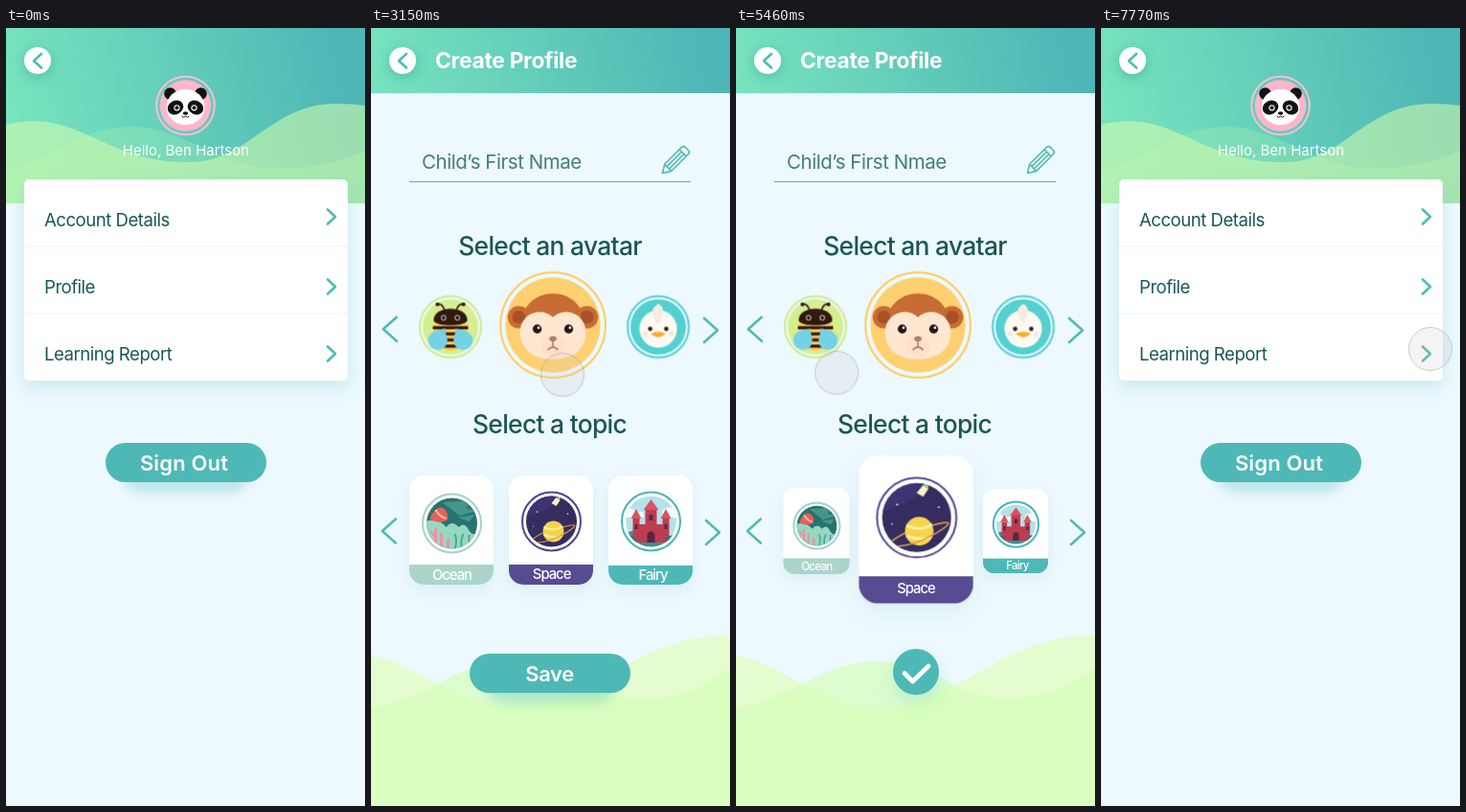
An HTML page that plays this animation: 375x812 px, repeating every 8 s.

```html
<!DOCTYPE html>
<html lang="en">
<head>
<meta charset="utf-8">
<title>Profile flow</title>
<style>
html, body { margin: 0; width: 100%; height: 100%; overflow: hidden; background: #edf9fe; }
svg { display: block; width: 375px; height: 812px; }
text { font-family: Inter, Roboto, sans-serif; fill: #1b5657; }
.mid { text-anchor: middle; }
.row { font-size: 18.6px; letter-spacing: -.5px; }
.heading { font-size: 26.4px; font-weight: 500; letter-spacing: -.7px; }
.button { font-size: 22px; font-weight: 600; fill: #fff; }
.label { font-size: 14.8px; font-weight: 500; letter-spacing: -1px; fill: #fff; }
.line { fill: none; stroke: #50bbb5; stroke-width: 2.6; stroke-linecap: round; stroke-linejoin: round; }
.ring { fill: none; stroke-width: 2; vector-effect: non-scaling-stroke; }
.soft { filter: drop-shadow(0 7px 9px rgba(60, 170, 175, .2)); }
.faint { filter: drop-shadow(0 6px 8px rgba(70, 150, 180, .1)); }
.shade { fill: #4eb8b6; opacity: .3; filter: blur(6px); }

#profile, #save, #tick, #press, #rest { animation: 8s step-end infinite; }
#profile { animation-name: profile; }
#save { animation-name: save; }
#tick { animation-name: tick; }
#press { animation-name: press; }
#rest { animation-name: rest; }
@keyframes profile { 0% { opacity: 0 } 17.5% { opacity: 1 } 79.625%, 100% { opacity: 0 } }
@keyframes save { 0% { opacity: 1 } 60.375%, 100% { opacity: 0 } }
@keyframes tick { 0% { opacity: 0 } 60.375%, 100% { opacity: 1 } }
@keyframes press {
  0%, 17.5%, 35%, 49%, 60.375%, 79.625%, 100% { opacity: 0 }
  15.75%, 33.25%, 47.25%, 59.5%, 77.875% { opacity: 1 }
}
@keyframes rest {
  0%, 17.5%, 35%, 49%, 60.375%, 79.625%, 100% { opacity: 1 }
  15.75%, 33.25%, 47.25%, 59.5%, 77.875% { opacity: 0 }
}

/* each item goes from its first place (--a) to its second (--b) */
.avatar { animation: pick-avatar 8s ease-out infinite; }
.topic { animation: pick-topic 8s ease-out infinite; }
@keyframes pick-avatar { 0%, 34.125% { transform: var(--a) } 37.625%, 100% { transform: var(--b) } }
@keyframes pick-topic { 0%, 48.125% { transform: var(--a) } 51.625%, 100% { transform: var(--b) } }
#bee { --a: translate(91px, 315px) scale(1); --b: translate(83px, 312px) scale(.8); }
#monkey { --a: translate(188px, 315px) scale(1); --b: translate(190px, 310px) scale(1.37); }
#bird { --a: translate(283px, 315px) scale(1); --b: translate(300px, 312px) scale(.8); }
#ocean { --a: translate(84px, 524px) scale(1); --b: translate(84px, 525px) scale(.79); }
#space { --a: translate(188px, 524px) scale(1); --b: translate(188px, 523.2px) scale(1.36); }
#fairy { --a: translate(292px, 524px) scale(1); --b: translate(292px, 525px) scale(.775); }
#space-label { --a: translate(188.6px, 575px); --b: translate(188px, 590px); }

#cursor { animation: travel 8s ease-in-out infinite; }
@keyframes travel {
  0%, 1.75% { transform: translate(392px, -30px) }
  7.875%, 10.5% { transform: translate(344px, 265px) }
  12.25%, 21.875% { transform: translate(344px, 272px) }
  27.125% { transform: translate(206px, 504px) }
  28% { transform: translate(206px, 504px); animation-timing-function: linear }
  28.875% { transform: translate(200px, 438px); animation-timing-function: linear }
  29.75% { transform: translate(199px, 369px); animation-timing-function: ease-out }
  30.625%, 31.5% { transform: translate(199px, 329px) }
  32.375%, 37.625% { transform: translate(199px, 324px) }
  43.75%, 44.625% { transform: translate(205px, 544px) }
  46.375%, 51.625% { transform: translate(199px, 536px) }
  56.875%, 63% { transform: translate(188px, 678px) }
  73.5% { transform: translate(23px, 44px) }
  74.375%, 84% { transform: translate(24px, 42px) }
  94.5% { transform: translate(339px, 329px) }
  97.125%, 100% { transform: translate(344px, 335px) }
}
</style>
</head>
<body>
<svg viewBox="0 0 375 812">
  <defs>
    <linearGradient id="top" gradientUnits="userSpaceOnUse" x1="10" y1="110" x2="350" y2="30">
      <stop offset="0" stop-color="#78e4be"/><stop offset="1" stop-color="#4eb6b6"/>
    </linearGradient>
    <clipPath id="disc"><circle r="26.5"/></clipPath>
    <clipPath id="card"><rect x="-44" y="-57" width="88" height="114" rx="15"/></clipPath>
    <path id="next" class="line" d="M-4-7.5 4 0l-8 7.5"/>
    <path id="arrow" class="line" d="M-7-12.5 7 0-7 12.5"/>
    <g id="back">
      <circle cx="33" cy="34" r="14" fill="#fff" style="filter:drop-shadow(0 3px 7px rgba(20,120,120,.35))"/>
      <path class="line" d="M37 27l-8 7.2 8 7.3"/>
    </g>
  </defs>

  <rect width="375" height="812" fill="#edf9fe"/>

  <g id="account">
    <rect width="375" height="183" fill="url(#top)"/>
    <path d="M0 150C45 140 75 103 130 103S225 147 285 147C325 147 350 138 375 128V183H0Z" fill="#a5f0b0" opacity=".3"/>
    <path d="M0 101C75 82 100 140 190 140C255 140 275 79 345 79Q362 79 375 81V183H0Z" fill="#d2fbad" opacity=".58"/>
    <use href="#back"/>

    <g transform="translate(187.5 81)">
      <circle r="30.3" fill="none" stroke="#f8bfd2" stroke-width="2"/>
      <circle r="26.8" fill="#ffb5cb"/>
      <g fill="#111">
        <circle cx="-16" cy="-12.5" r="6.3"/><circle cx="16" cy="-12.5" r="6.3"/>
        <ellipse cy="1.5" rx="20" ry="18.7" fill="#fff"/>
        <ellipse cx="-10.5" cy="2" rx="8.6" ry="7" transform="rotate(-28 -10.5 2)"/>
        <ellipse cx="10.5" cy="2" rx="8.6" ry="7" transform="rotate(28 10.5 2)"/>
        <g stroke="#fff" stroke-width="1.1"><circle cx="-9" cy="2.3" r="2.6"/><circle cx="9" cy="2.3" r="2.6"/></g>
        <ellipse cy="8" rx="2.8" ry="1.7"/>
        <path d="M-4 11q2 2.5 4 0q2 2.5 4 0" fill="none" stroke="#111"/>
      </g>
    </g>
    <text class="mid" x="188" y="133" style="font-size:15px;fill:#fff">Hello, Ben Hartson</text>

    <rect x="19" y="158" width="338" height="210" rx="5" fill="#fff" class="soft"/>
    <path d="M19 228h338M19 298h338" stroke="#eef7f8" stroke-width="1.5"/>
    <text class="row" x="40" y="207">Account Details</text>
    <text class="row" x="40" y="277">Profile</text>
    <text class="row" x="40" y="347">Learning Report</text>
    <use href="#next" x="340" y="197"/><use href="#next" x="340" y="270"/><use href="#next" x="340" y="340"/>

    <rect class="shade" x="122" y="447" width="132" height="38" rx="19"/>
    <rect x="104" y="433" width="168" height="41" rx="20.5" fill="#4eb8b6"/>
    <text class="button mid" x="186" y="461.5" letter-spacing=".15">Sign Out</text>
  </g>

  <g id="profile">
    <rect width="375" height="812" fill="#edf9fe"/>
    <path d="M0 655C42 660 88 708 145 708C240 708 270 634 375 634V812H0Z" fill="#e5fccf"/>
    <path d="M0 709C60 702 85 661 150 661S225 700 285 700C325 700 348 688 375 667V812H0Z" fill="#d3ffb7" opacity=".65"/>
    <rect width="375" height="68" fill="url(#top)"/>
    <use href="#back"/>
    <text x="67" y="42" style="font-size:22.8px;font-weight:700;letter-spacing:-.3px;fill:#fff">Create Profile</text>

    <text x="53" y="147" style="font-size:20.5px;letter-spacing:-.45px;fill:#457d80">Child’s First Nmae</text>
    <path d="M40 160.5h294" stroke="#8c999c"/>
    <g transform="translate(304.5 151.5) rotate(-45)" class="line" style="stroke-width:1.6">
      <path d="M0 0 8-5H33q3 0 3 3V2q0 3-3 3H8ZM8-5V5M8-1.7H30M8 1.7H30M30-5V5"/>
    </g>

    <text class="heading mid" x="187" y="237">Select an avatar</text>
    <text class="heading mid" x="186.5" y="423">Select a topic</text>
    <use href="#arrow" transform="translate(19.8 314.3) scale(-1 1)"/><use href="#arrow" x="355" y="315.5"/>
    <use href="#arrow" transform="translate(18.8 525) scale(-1 1)"/><use href="#arrow" x="357" y="526.5"/>

    <g id="bee" class="avatar">
      <circle r="40" class="ring" stroke="#cfea86" fill="#fff"/>
      <circle r="36.2" fill="#d5ef8f"/>
      <path d="M-8-22q-2-8-8-8M8-22q2-8 8-8" fill="none" stroke="#33180f" stroke-width="2"/>
      <circle cx="-17" cy="-29.5" r="2.6" fill="#33180f"/><circle cx="17" cy="-29.5" r="2.6" fill="#33180f"/>
      <path d="M-23-4H23Q20 29 0 31Q-20 29-23-4Z" fill="#ffcb4f"/>
      <path d="M-23 1H23M-22 9H22M-19 17H19M-14 25H14" stroke="#33180f" stroke-width="4"/>
      <path d="M-22-9C-22-29 22-29 22-9C22 0-22 0-22-9Z" fill="#33180f"/>
      <circle cx="-9" cy="-12" r="3.4" fill="#fff"/><circle cx="9" cy="-12" r="3.4" fill="#fff"/>
      <circle cx="-9" cy="-12" r="2.5" fill="#111"/><circle cx="9" cy="-12" r="2.5" fill="#111"/>
      <path d="M-6 2C-20 3-29 8-29 17C-29 34-4 34-4 17C-4 10-8 8-6 2Z" fill="#74d1e6"/>
      <path d="M6 2C20 3 29 8 29 17C29 34 4 34 4 17C4 10 8 8 6 2Z" fill="#74d1e6"/>
    </g>

    <g id="bird" class="avatar">
      <circle r="40" class="ring" stroke="#51cfcf" fill="#fff"/>
      <circle r="36.2" fill="#54d0d1"/>
      <circle cy="2.5" r="24.5" fill="#fffaf3"/>
      <path d="M0-30Q8-26 6-17Q4-8 0-4Q-4-8-7-15Q-10-24 0-30Z" fill="#f7ecdc"/>
      <circle cx="-10.5" cy="2.5" r="2.9" fill="#33201a"/><circle cx="10.5" cy="2.5" r="2.9" fill="#33201a"/>
      <circle cx="-17" cy="9" r="3.5" fill="#fbe6dc"/><circle cx="17" cy="9" r="3.5" fill="#fbe6dc"/>
      <path d="M-10 9Q0 3 10 9Q0 18-10 9Z" fill="#ffab2e"/>
    </g>

    <g id="monkey" class="avatar">
      <circle r="40" class="ring" stroke="#ffca5d" fill="#fff"/>
      <circle r="36.2" fill="#ffd070"/>
      <g fill="#c76d33">
        <circle cx="-26" cy="-6" r="8.5"/><circle cx="26" cy="-6" r="8.5"/>
        <path d="M-25 3C-25-33 25-33 25 3Z"/>
      </g>
      <circle cx="-26" cy="-6" r="5" fill="#a95029"/><circle cx="26" cy="-6" r="5" fill="#a95029"/>
      <path d="M0-6C10-15 26-8 25 7C24 20 14 26 0 26S-24 20-25 7C-26-8-10-15 0-6Z" fill="#ffe6d0"/>
      <ellipse cy="16" rx="9" ry="8" fill="#fde0ca"/>
      <circle cx="-12" cy="3" r="3.4" fill="#251612"/><circle cx="12" cy="3" r="3.4" fill="#251612"/>
      <circle cx="-11" cy="2" r="1" fill="#fff"/><circle cx="13" cy="2" r="1" fill="#fff"/>
      <ellipse cy="10.5" rx="2.8" ry="2" fill="#a8806a"/>
      <path d="M0 12v4.500M-4 19q4-4.500 8 0" fill="none" stroke="#a8806a" stroke-width="1.2"/>
    </g>

    <g id="ocean" class="topic">
      <g class="faint"><g clip-path="url(#card)">
        <rect x="-44" y="-57" width="88" height="114" fill="#fff"/><rect x="-44" y="36" width="88" height="21" fill="#abd5ca"/>
      </g></g>
      <text class="label mid" x=".5" y="51.5">Ocean</text>
      <g transform="translate(.5 -7)">
        <circle r="30.5" class="ring" stroke="#a5d3c6"/>
        <g clip-path="url(#disc)">
          <circle r="27" fill="#28736f"/>
          <path d="M-10-22l32-2-8 8 12 3-18 5M6-6l18-3-6 7" fill="#43978a"/>
          <path d="M-28-2Q-14-6-6 4Q0-4 7 4Q13-2 17 6T28 10V28H-28Z" fill="#94d8c2"/>
          <path d="M-23-4Q-18-19-9-16Q-2-10-5-3Q-14 1-23-4Z" fill="#e8605c"/>
          <path d="M-17-14q4 7 11 9" fill="none" stroke="#ffc2a3" stroke-width="2"/>
          <g fill="none" stroke="#ef91a4" stroke-width="3" stroke-linecap="round">
            <path d="M-17 24V6M-11 27V11M-17 14l-5-5M-4 28V17"/>
          </g>
          <path d="M3 27q3-9 0-16M11 28q-3-9 1-17M18 24V12" fill="none" stroke="#4ca795" stroke-width="2"/>
        </g>
      </g>
    </g>

    <g id="fairy" class="topic">
      <g class="faint"><g clip-path="url(#card)">
        <rect x="-44" y="-57" width="88" height="114" fill="#fff"/><rect x="-44" y="37" width="88" height="20" fill="#4eb8b6"/>
      </g></g>
      <text class="label mid" x="2.5" y="52">Fairy</text>
      <g transform="translate(.5 -9)">
        <circle r="30.5" class="ring" stroke="#49b6b3"/>
        <g clip-path="url(#disc)">
          <circle r="27" fill="#b3e2e8"/>
          <path d="M-28-10q8-7 12 0h8v6h-20ZM12-12q8-6 16 0v8H12Z" fill="#f3fbfb"/>
          <path d="M-28 13Q-12 5 0 13T28 11V28H-28Z" fill="#3b8e91"/>
          <path d="M-19 22V-3h7v6h6V-13H6V3h6v-6h7V22Z" fill="#bf3c50"/>
          <path d="M-21-3l5.5-10L-10-3ZM-8-12 0-23 8-12ZM10-3l5.5-10L21-3Z" fill="#dd5361"/>
          <path d="M-4 22V13q4-6 8 0v9ZM-2-7h4v6h-4ZM-17 3h3v5h-3ZM14 3h3v5h-3Z" fill="#5a2740"/>
          <circle cx="-20" cy="20" r="5" fill="#2d7479"/><circle cx="20" cy="20" r="5" fill="#2d7479"/>
        </g>
      </g>
    </g>

    <g id="space" class="topic">
      <g class="faint"><g clip-path="url(#card)">
        <rect x="-44" y="-57" width="88" height="114" fill="#fff"/><rect x="-44" y="36" width="88" height="21" fill="#574c92"/>
      </g></g>
      <g transform="translate(.5 -9)">
        <circle r="30.5" class="ring" stroke="#51458f"/>
        <g clip-path="url(#disc)">
          <circle r="27" fill="#352c60"/>
          <path d="M-28-28H9Q3-12-28-4Z" fill="#3e3471"/>
          <circle cx="2" cy="10.5" r="11" fill="#f6d44e"/>
          <path d="M-8 6Q3 11 12 5M-8 14Q3 18 11 15" fill="none" stroke="#fff0a4" stroke-width="2"/>
          <path d="M-9 12C-35 25-10 24 5 17S36-1 12 6" fill="none" stroke="#d99a45" stroke-width="1.2"/>
          <path d="M0-19l5-6 4 3-4 6Z" fill="#fff4c5"/><path d="M5-25l4-2v5Z" fill="#8dd0a0"/>
          <g fill="#fff"><circle cx="-15" cy="-10" r=".7"/><circle cx="17" cy="-8" r=".7"/><circle cx="-19" cy="5" r=".6"/></g>
        </g>
      </g>
    </g>
    <g id="space-label" class="topic"><text class="label mid">Space</text></g>

    <g id="save">
      <rect class="shade" x="121" y="667" width="132" height="38" rx="19"/>
      <rect x="103" y="653" width="168" height="41" rx="20.5" fill="#4eb8b6"/>
      <text class="button mid" x="186.5" y="682" letter-spacing="-.4">Save</text>
    </g>
    <g id="tick">
      <circle cx="188" cy="672" r="24" fill="#4eb8b6" class="soft"/>
      <path d="M176 673.5l8.5 8.500L201 666" fill="none" stroke="#fff" stroke-width="4.8" stroke-linecap="round" stroke-linejoin="round"/>
    </g>
  </g>

  <g id="cursor">
    <circle id="rest" r="22.5" fill="#c8c8c8" fill-opacity=".2" stroke="#8c9494" stroke-opacity=".45"/>
    <circle id="press" r="21.5" fill="#d3d3d3" fill-opacity=".58" stroke="#7e8a88" stroke-opacity=".65"/>
  </g>
</svg>
</body>
</html>
```
